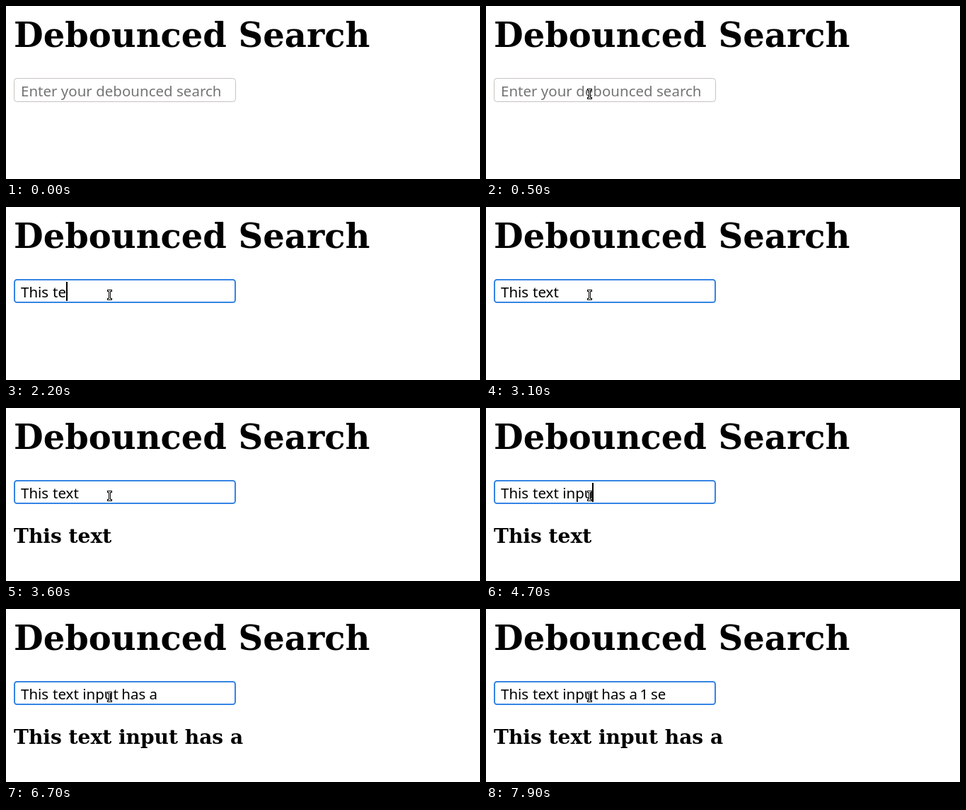
Write an HTML page that moves like this. It is 670 px wide and 245 px high and loops after 8 s.

```html
<!DOCTYPE html>
<html lang="en">
<head>
<meta charset="utf-8">
<title>Debounced Search</title>
<style>
  html, body { margin: 0; width: 100%; height: 100%; overflow: hidden; background: #fff; }
  svg { display: block; }
  .heading { font-family: "DejaVu Serif", serif; font-weight: bold; }
  .field { font: 20.5px "Noto Sans", sans-serif; }
</style>
</head>
<body>
<svg width="670" height="245" viewBox="0 0 670 245">
  <text class="heading" x="11" y="58" font-size="48">Debounced Search</text>
  <rect id="box" fill="#fff"/>
  <text id="placeholder" class="field" x="21" y="128" fill="#757575">Enter your debounced search</text>
  <text id="typed" class="field" y="128"></text>
  <rect id="caret" y="106" width="2" height="27"/>
  <text id="result" class="heading" x="11" y="191" font-size="28.08"></text>
  <g id="pointer">
    <path id="arrow" d="M0 0V17L4 13.2L6.6 19L9.2 17.9L6.7 12.2H12Z" stroke="#fff"/>
    <g id="beam" fill="none">
      <path d="M-2 -6H2M0 -6V6M-2 6H2" stroke="#000" stroke-width="3" stroke-linecap="square"/>
      <path d="M-2 -6H2M0 -6V6M-2 6H2" stroke="#fff" stroke-linecap="square"/>
    </g>
  </g>
</svg>
<script>
const LOOP = 8000, FOCUS = 700, DEBOUNCE = 1000;

// Each keystroke: time, character, caret position afterwards
const keys = [
  [1300, 'T', 33], [1500, 'h', 45], [1600, 'i', 50], [1700, 's', 60], [1900, ' ', 65],
  [2000, 't', 74], [2200, 'e', 85], [2400, 'x', 96], [2600, 't', 104], [3900, ' ', 109],
  [4100, 'i', 114], [4200, 'n', 126], [4400, 'p', 139], [4700, 'u', 150], [4800, 't', 159],
  [4900, ' ', 164], [5000, 'h', 176], [5100, 'a', 187], [5200, 's', 198], [5400, ' ', 203],
  [5500, 'a', 214], [5600, ' ', 219], [7300, '1', 228], [7500, ' ', 233], [7600, 's', 243],
  [7900, 'e', 254]
];
const wordX = [21, 66, 108.2, 163.3, 202.6, 217.5, 233];
const caretOff = [[3100, 3900], [6700, 7300], [7900, LOOP]];
const pointerPath = [[200, 209, 230], [300, 180, 172], [400, 153, 129], [500, 147, 124]];

const el = id => document.getElementById(id);
const set = (id, attrs) => {
  for (const name in attrs) el(id).setAttribute(name, attrs[name]);
};
const show = (id, on) => set(id, { visibility: on ? 'visible' : 'hidden' });
const textOf = list => list.map(key => key[1]).join('');

// The result follows the field after a full pause in typing
function resultAt(t) {
  let text = '';
  keys.forEach(([time], i) => {
    const next = keys[i + 1]?.[0] ?? Infinity;
    if (next - time > DEBOUNCE && t >= time + DEBOUNCE) text = textOf(keys.slice(0, i + 1));
  });
  return text.trim();
}

function draw(t) {
  const pressed = keys.filter(key => key[0] <= t);
  const focused = t >= FOCUS;
  const line = focused ? 2 : 1;

  set('box', {
    x: 11 + line / 2, y: 102 + line / 2, width: 314 - line, height: 34 - line,
    rx: 4.5 - line / 2, stroke: focused ? '#3584e4' : '#c6c2be', 'stroke-width': line
  });
  show('placeholder', !pressed.length);
  el('typed').innerHTML = textOf(pressed).split(' ')
    .map((word, i) => `<tspan x="${wordX[i]}">${word}</tspan>`).join('');
  el('result').textContent = resultAt(t);

  set('caret', { x: pressed.length ? pressed.at(-1)[2] : 20 });
  show('caret', focused && !caretOff.some(([from, to]) => t >= from && t < to));

  const spot = pointerPath.findLast(point => point[0] <= t);
  const overField = spot && spot[2] < 136;
  if (spot) set('pointer', { transform: `translate(${spot[1] - 0.5} ${spot[2] + 0.5})` });
  show('arrow', spot && !overField);
  show('beam', overField);
}

const start = performance.now();
function tick() {
  draw((performance.now() - start) % LOOP);
  requestAnimationFrame(tick);
}
tick();
</script>
</body>
</html>
```
